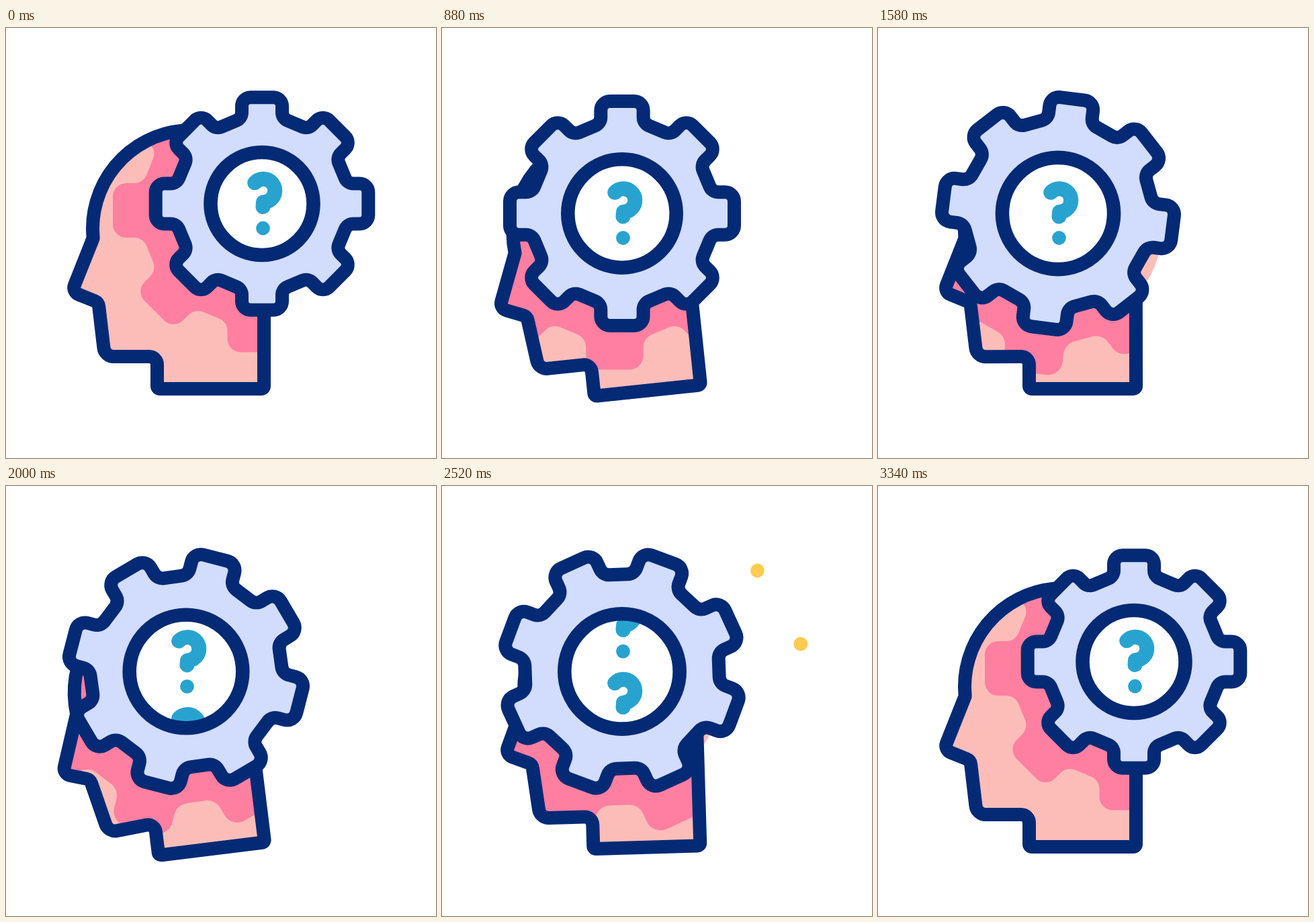
Recreate the animation shown at these times as an HTML page with a canvas. Size 640 by 640 pixels, loop 3.54 s.

```html
<!DOCTYPE html>
<html lang="en">
<head>
<meta charset="utf-8">
<title>Thinking head</title>
<style>
  html, body { margin: 0; height: 100%; overflow: hidden; background: #fff; }
  canvas { display: block; width: 100vmin; height: 100vmin; }
</style>
</head>
<body>
<canvas id="stage" width="640" height="640"></canvas>
<script>
const ctx = document.getElementById('stage').getContext('2d');
const LOOP = 3540, TAU = Math.PI * 2, DEG = Math.PI / 180;
const NAVY = '#042a75', SKIN = '#fcbdb8', PINK = '#ff7fa1', PALE = '#d2dcfc',
      TEAL = '#28a3d0', YELLOW = '#fdcb50';

const span = (t, a, b) => Math.max(0, Math.min(1, (t - a) / (b - a)));
const smooth = u => u * u * (3 - 2 * u);
const ease = (t, a, b) => smooth(span(t, a, b));
const pulse = (t, a, b) => Math.sin(Math.PI * span(t, a, b)) ** 2;
const mix = (a, b, u) => a + (b - a) * u;

// The gear pulls out, dives into the head, turns there and comes back.
function pose(t) {
  const pull = ease(t, 180, 320), dive = ease(t, 320, 648), back = ease(t, 2860, 3320);
  return {
    x: 381 + 19 * pull - 132 * dive + 113 * back,
    y: 261.5 - 16.5 * pull + 31 * dive - 14.5 * back,
    size: 1 + .12 * (span(t, 180, 2520) ** .65 - back),
    turn: -135 * smooth(span(t, 1002, 3162) ** .8),
    tilt: 8.45 * (pulse(t, 540, 1610) + pulse(t, 1610, 2680)),
    bend: pulse(t, 1600, 2450),
    scroll: 115 * ease(t, 1660, 3220)
  };
}

function gearPath(x, y, turn, reach, half, base, radius) {
  const pts = [], tooth = [[-half, -base], [-half, -reach], [half, -reach], [half, -base]];
  for (let i = 0; i < 8; i++) {
    const a = (turn + i * 45) * DEG, c = Math.cos(a), s = Math.sin(a);
    for (const [px, py] of tooth) pts.push([x + px * c - py * s, y + px * s + py * c]);
  }
  const path = new Path2D(), first = pts[0], last = pts.at(-1);
  path.moveTo((first[0] + last[0]) / 2, (first[1] + last[1]) / 2);
  pts.forEach((p, i) => path.arcTo(...p, ...pts[(i + 1) % pts.length], radius));
  path.closePath();
  return path;
}

// Neck, jaw, lip and nose as rounded corners, then the arc of the skull.
function headPath(bend) {
  const path = new Path2D();
  const corners = [
    [384, 537, 4], [225, 537, 4], [225, 489, 12],
    [147 + 8 * bend, 489 + 5 * bend, 15],
    [137.5, 408.5 + 4 * bend, 10],
    [98, 392.5 + 7 * bend, 11],
    [129.7, 313]
  ];
  path.moveTo(384, 372);
  corners.slice(0, -1).forEach(([x, y, r], i) => {
    const [nextX, nextY] = corners[i + 1];
    path.arcTo(x, y, nextX, nextY, r);
  });
  path.arc(276, 299, 147, Math.PI - .095, Math.PI * 1.5 - .03);
  return path;
}

function circle(x, y, r) {
  const path = new Path2D();
  path.arc(x, y, r, 0, TAU);
  return path;
}

function fill(color, path) {
  ctx.fillStyle = color;
  ctx.fill(path);
}

function stroke(color, width, path) {
  ctx.strokeStyle = color;
  ctx.lineWidth = width;
  ctx.stroke(path);
}

function lean(tilt) {
  ctx.translate(330, 525);
  ctx.rotate(-tilt * DEG);
  ctx.translate(-330, -525);
}

function drawHead({ x, y, size, turn, tilt, bend }) {
  const outline = headPath(bend);
  ctx.save();
  lean(tilt);
  fill(SKIN, circle(276, 299, 147));
  fill(SKIN, outline);
  ctx.clip(outline);
  ctx.resetTransform();
  fill(PINK, gearPath(x - 11, y + 10, turn, 211 * size, 40.5 * size, 166 * size, 20 * size));
  ctx.restore();

  ctx.save();
  lean(tilt);
  ctx.lineCap = 'butt';
  stroke(NAVY, 20, outline);
  ctx.restore();
}

function drawQuestion(x, y) {
  const hook = new Path2D();
  hook.arc(x + 2, y - 19.5, 17.3, -2.4, Math.PI / 2);
  hook.lineTo(x + 1.5, y + 4.5);
  stroke(TEAL, 22, hook);
  fill(TEAL, circle(x + 1.5, y + 36.5, 10.4));
}

function drawGear({ x, y, size, turn, scroll }) {
  const gear = gearPath(x, y, turn, 158.3 * size, 30 * size, 127 * size, 13 * size);
  const ring = circle(x, y, 76.5 * size);
  fill(PALE, gear);
  stroke(NAVY, 20, gear);
  fill('#fff', ring);

  ctx.save();
  ctx.clip(ring);
  drawQuestion(x, y - scroll);
  if (scroll > 0) drawQuestion(x, y - scroll + 115);
  ctx.restore();

  stroke(NAVY, 20.6, ring);
}

// Three rays fan out from one point; each tail follows its tip.
function drawRays(t) {
  for (const side of [-1, 0, 1]) {
    const life = side ? 500 : 470, inner = side ? 56 : 42;
    if (t < 0 || t > life) continue;
    const angle = (-30.5 + 38.5 * side) * DEG;
    const tip = 1 - (1 - span(t, 0, 340)) ** 2, tail = span(t, 100, life - 15);
    const ray = new Path2D();
    for (const u of [tail, tip]) {
      const r = mix(inner, 102, u);
      ray.lineTo(433 + r * Math.cos(angle), 221 + r * Math.sin(angle));
    }
    stroke(YELLOW, 20.5, ray);
  }
}

function draw(t) {
  const now = pose(t);
  ctx.clearRect(0, 0, 640, 640);
  ctx.lineJoin = ctx.lineCap = 'round';
  drawHead(now);
  drawGear(now);
  drawRays(t - 960);
  drawRays(t - 2040);
}

function frame() {
  draw(performance.now() % LOOP);
  requestAnimationFrame(frame);
}
frame();
</script>
</body>
</html>
```
